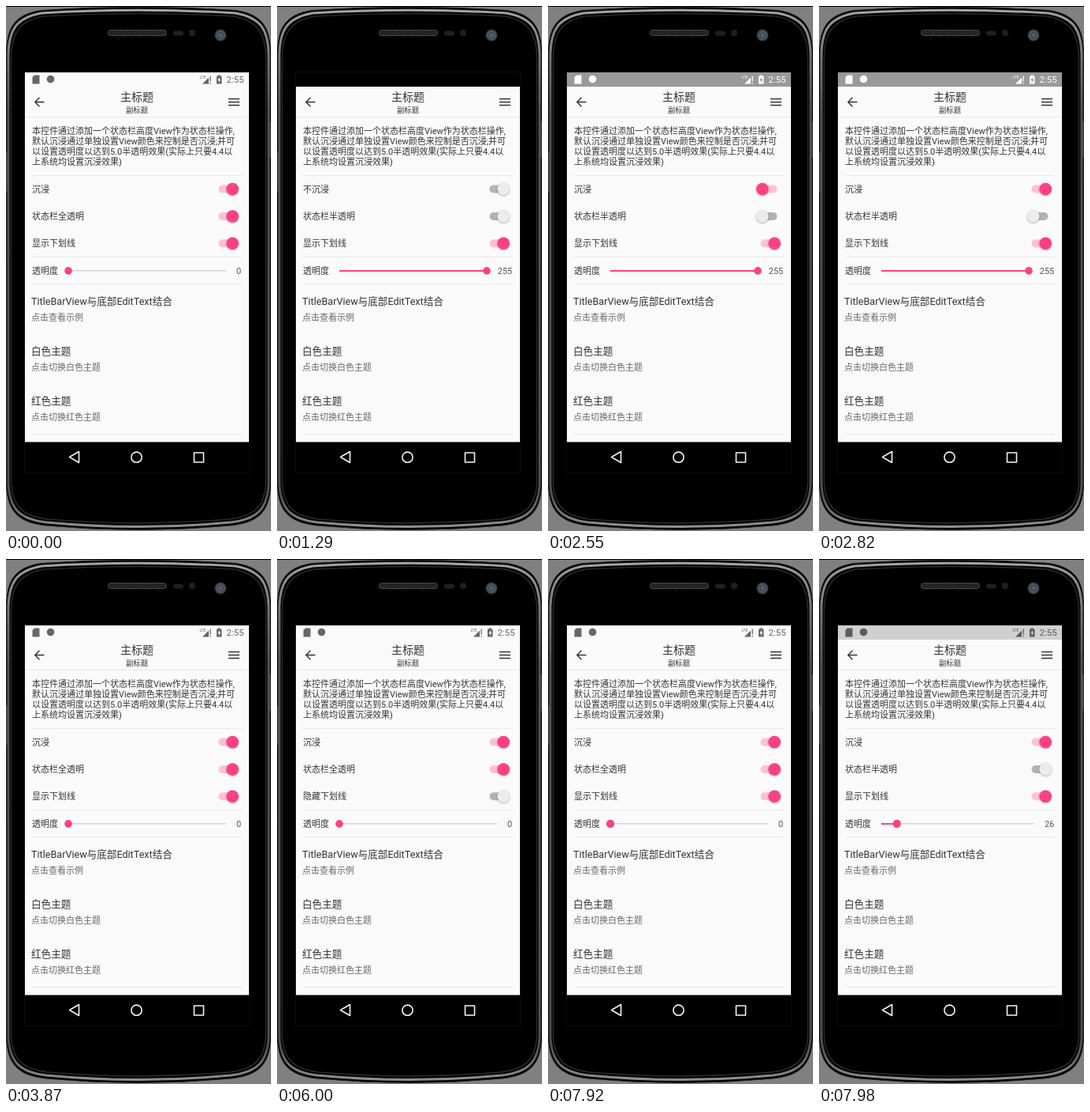
Recreate the animation shown at these times as an HTML page. Size 336 by 664 pixels, loop 8000 ms.

```html
<!DOCTYPE html>
<html lang="zh-CN">
<head>
<meta charset="utf-8">
<style>
html, body { margin: 0; width: 100%; height: 100%; overflow: hidden; background: #808080; }
svg { display: block; width: 336px; height: 664px; font-family: Roboto, "Noto Sans CJK SC", "Noto Sans CJK", sans-serif; font-size: 11px; fill: #333; }
.rule { fill: #e9e9e9; }
.head { font-size: 12.6px; }
.sub { fill: #686868; }
.line { fill: none; stroke: #333; stroke-width: 1.4; }
.nav { fill: none; stroke: #f4f4f4; stroke-width: 1.6; stroke-linejoin: round; }
</style>
</head>
<body>
<svg viewBox="0 0 336 664">
  <defs>
    <linearGradient id="rim" gradientUnits="userSpaceOnUse" x1="0" y1="0" x2="0" y2="664">
      <stop offset="0" stop-color="#aaa"/><stop offset=".05" stop-color="#888"/>
      <stop offset=".2" stop-color="#555"/><stop offset=".93" stop-color="#505050"/>
      <stop offset="1" stop-color="#999"/>
    </linearGradient>
    <radialGradient id="lens">
      <stop offset="0" stop-color="#66717e"/><stop offset=".45" stop-color="#3c444e"/>
      <stop offset=".6" stop-color="#525a63"/><stop offset="1" stop-color="#30343a"/>
    </radialGradient>
    <pattern id="mesh" width="3" height="3" patternUnits="userSpaceOnUse">
      <rect width="3" height="3" fill="#161616"/><path d="M0 3L3 0" stroke="#404040"/>
    </pattern>
    <filter id="soft"><feGaussianBlur stdDeviation=".8"/></filter>
  </defs>

  <rect width="336" height="1" fill="#000"/>
  <path d="M.5 60C1 28 10 11 44 5.500Q168 -3 292 5.500C326 11 335 28 335.500 60V606C334 640 320 653 286 657Q168 668 50 657C16 653 2 640 .5 606Z" fill="#000" stroke="#222"/>
  <path fill="none" stroke="url(#rim)" stroke-width="3" d="M3 60C4 31 12 15 45 9Q168 1.500 291 9C324 15 332 31 333 60V605C331 637 318 649 285 653Q168 664 51 653C18 649 5 637 3 605Z"/>
  <path fill="none" stroke="#2a2a2a" stroke-width="1.500" d="M6.500 62C7.500 36 16 19 47 13Q168 6 289 13C320 19 328.500 36 329.500 62V604C327.500 633 315 645 284 649Q168 659 52 649C21 645 8.500 633 6.500 604Z"/>
  <rect y="185" width="2" height="50" fill="#444"/>
  <rect x="334" y="146" width="2" height="46" fill="#444"/>
  <rect x="129.500" y="30.500" width="74" height="7" rx="3" fill="url(#mesh)" stroke="#484848"/>
  <rect x="212" y="31.500" width="13" height="6" rx="3" fill="#202020"/>
  <circle cx="236" cy="34" r="4" fill="#202020"/>
  <circle cx="272" cy="37" r="7.500" fill="url(#lens)"/>
  <rect x="23.500" y="83.500" width="285" height="507" fill="#000" stroke="#0c0c0c"/>

  <rect x="24" y="84" width="284" height="467.500" fill="#fafafa"/>
  <rect id="bar" x="24" y="84" width="284" height="18"/>
  <g id="icons">
    <path d="M36 87.500h6.500v11h-9v-8.500z"/>
    <circle cx="56.500" cy="92.500" r="4.800"/>
    <text x="245.500" y="92" font-size="5">LTE</text>
    <path d="M249 98.500L257 90.500V98.500zM258.500 88.500h1.300v7h-1.300zM258.500 97h1.300v1.500h-1.300z"/>
    <path fill-rule="evenodd" d="M268.500 87.500h3.500v1.300h1.500v9.700h-6.500v-9.700h1.500zM271 90l-2.700 4h1.500v3l2.500-4h-1.300z"/>
    <text x="279.500" y="97.300" font-size="11.500">2:55</text>
  </g>

  <path class="line" d="M48.500 121.500H37M42.500 115.800L36.800 121.500L42.500 127.200M282 117.500h14M282 121.500h14M282 125.500h14"/>
  <g text-anchor="middle">
    <text x="166" y="120.300" font-size="14">主标题</text>
    <text x="166" y="134.800" font-size="9.300">副标题</text>
  </g>
  <g class="rule">
    <rect x="24" y="140" width="284" height="1"/>
    <rect x="33" y="214" width="266" height="1"/>
    <rect x="33" y="317" width="266" height="1"/>
    <rect x="33" y="351" width="266" height="1"/>
    <rect x="33" y="541" width="266" height="1"/>
  </g>
  <text x="33" y="161.800">本控件通过添加一个状态栏高度View作为状态栏操作,</text>
  <text x="33" y="174.800">默认沉浸通过单独设置View颜色来控制是否沉浸;并可</text>
  <text x="33" y="187.800">以设置透明度以达到5.0半透明效果(实际上只要4.4以</text>
  <text x="33" y="200.800">上系统均设置沉浸效果)</text>

  <g id="switches"></g>

  <text x="33" y="339">透明度</text>
  <rect id="track" x="79" y="334" height="1.500" fill="#d4d4d4"/>
  <g fill="#ff4081">
    <rect id="done" x="79" y="334" width="0" height="2"/>
    <circle id="knob" cy="334.900"/>
  </g>
  <text id="value" x="298.300" y="339" text-anchor="end" fill="#555"></text>

  <g class="head">
    <text x="32" y="378">TitleBarView与底部EditText结合</text>
    <text x="32" y="441">白色主题</text>
    <text x="32" y="504.300">红色主题</text>
  </g>
  <g class="sub">
    <text x="32" y="398">点击查看示例</text>
    <text x="32" y="461">点击切换白色主题</text>
    <text x="32" y="524.300">点击切换红色主题</text>
  </g>

  <path class="nav" d="M92.500 563.500V577.500L80.500 570.500zM238.500 565h12v12h-12z"/>
  <circle class="nav" cx="165.500" cy="570.700" r="6.600"/>
</svg>
<script>
const LOOP = 8000, STEP = 30;
const $ = id => document.getElementById(id);
const set = (el, attrs) => { for (const k in attrs) el.setAttribute(k, attrs[k]); };

// Each flip is [start, duration]; every switch begins the loop turned on.
const rows = [
  { y: 231.5, on: '沉浸', off: '不沉浸', flips: [[1290, 240], [2550, 270]] },
  { y: 266, on: '状态栏全透明', off: '状态栏半透明', flips: [[1290, 240], [3660, 210], [7980, 240]] },
  { y: 300.2, on: '显示下划线', off: '隐藏下划线', flips: [[6000, 240], [6780, 240]] }
];

$('switches').innerHTML = rows.map(({ y }) => `<g>
  <text x="33" y="${y + 4.2}"></text>
  <rect x="269.500" y="${y - 5}" width="21" height="10" rx="5"/>
  <circle cy="${y + .8}" r="8" fill="#000" opacity=".28" filter="url(#soft)"/>
  <circle cy="${y}" r="7.800"/></g>`).join('');
rows.forEach((row, i) => row.parts = [...$('switches').children[i].children]);

const ease = p => (1 - Math.cos(Math.PI * Math.min(1, p))) / 2;

function drawSwitch({ on, off, flips, parts }, t) {
  const past = flips.filter(f => f[0] <= t);
  const isOn = past.length % 2 === 0;
  const last = past[past.length - 1];
  const p = last ? ease((t - last[0]) / last[1]) : 1;
  const x = 271.8 + 15.4 * (isOn ? p : 1 - p);
  const [label, track, shadow, thumb] = parts;
  label.textContent = isOn ? on : off;
  set(track, { fill: isOn ? '#ffc0d4' : '#b3b3b3' });
  set(shadow, { cx: x });
  set(thumb, { cx: x, fill: isOn ? '#ff4081' : '#ececec' });
}

function drawSeek(value, pressed) {
  const width = 200 - 6.5 * (String(value).length - 1);
  const done = width * value / 255;
  set($('track'), { width });
  set($('done'), { width: done });
  set($('knob'), { cx: 79 + done, r: 4.8 + pressed * .3 });
  $('value').textContent = value;
}

function drawStatus(t) {
  const [bar, icons] =
    t >= 7980 ? ['#d0d0d0', '#5c5c5c'] :
    t < 1290 || t >= 3660 ? ['#fafafa', '#666'] :
    t < 2550 ? ['#000', '#000'] : ['#999', '#fff'];
  set($('bar'), { fill: bar });
  set($('icons'), { fill: icons });
}

function frame(now) {
  const t = Math.floor(now % LOOP / STEP) * STEP;
  rows.forEach(row => drawSwitch(row, t));
  drawSeek(t >= 7980 ? 26 : t >= 1290 && t < 3660 ? 255 : 0, t >= 7920);
  drawStatus(t);
  requestAnimationFrame(frame);
}
frame(0);
</script>
</body>
</html>
```
